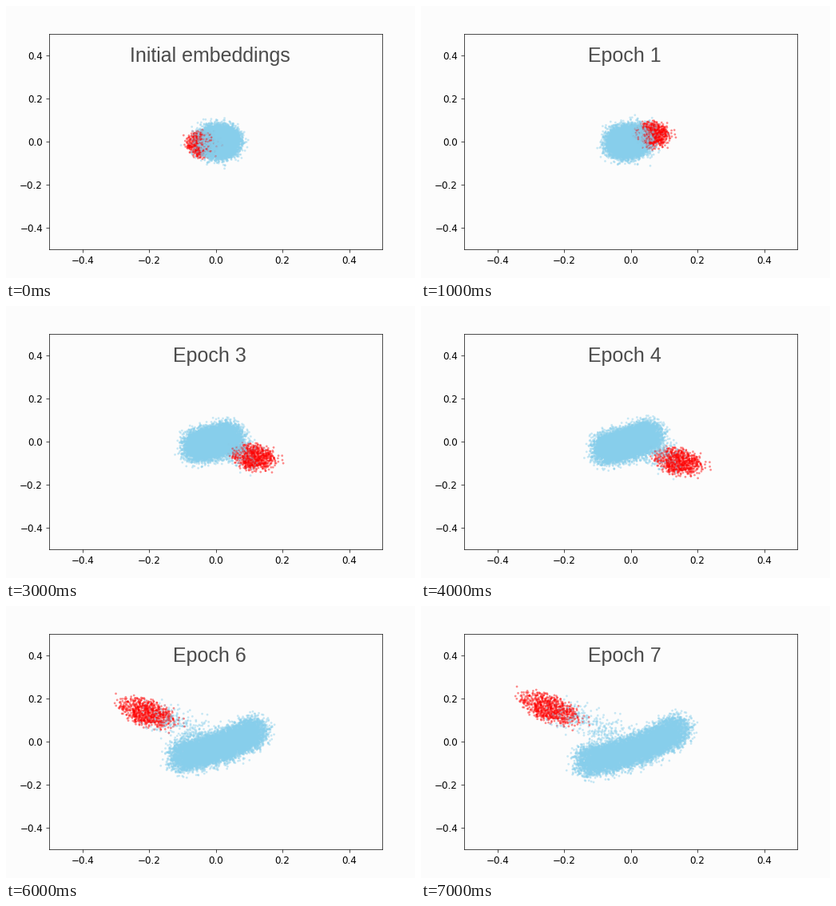
Recreate the animation shown at these times as a matplotlib script. Size 512 by 341 pixels, loop 8 s.

```python
import numpy as np
import matplotlib.pyplot as plt
from matplotlib.animation import FuncAnimation

W, H, DPI = 512, 341, 100
LEFT, RIGHT, TOP, BOTTOM = 54.4, 471.2, 34.95, 304.95
BG = "#fcfcfc"
EPOCHS = 8
N_BLUE, N_BRIDGE, N_RED = 9500, 300, 700
ORIGIN = np.array([263, 170])

rng = np.random.default_rng(7)


def soft_disc(n, core, blur):
    """Unit disc with a fuzzy rim and a few outliers."""
    r = core * np.sqrt(rng.random(n))
    a = 2 * np.pi * rng.random(n)
    disc = np.column_stack([r * np.cos(a), r * np.sin(a)])
    return disc + rng.normal(0, blur, (n, 2))


blue_disc = soft_disc(N_BLUE, 0.74, 0.22)
blue_t = rng.uniform(-1, 1, N_BLUE)
red_disc = soft_disc(N_RED, 0.80, 0.20)
bridge_t = rng.uniform(0.1, 0.9, (N_BRIDGE, 1))
bridge_noise = rng.normal(0, 10, (N_BRIDGE, 2))
order = rng.permutation(N_BLUE + N_BRIDGE + N_RED)


def place(x, y, center, tilt):
    """Rotate by tilt degrees (y up) and move to a stage position."""
    c, s = np.cos(np.radians(tilt)), np.sin(np.radians(tilt))
    return np.column_stack([c * x - s * y, -s * x - c * y]) + center


def to_data(p):
    x = (p[:, 0] - LEFT) / (RIGHT - LEFT) - 0.5
    y = 0.5 - (p[:, 1] - TOP) / (BOTTOM - TOP)
    return np.column_stack([x, y])


def points(epoch):
    # The projection axes change sign between some epochs.
    side = 1 if 1 <= epoch <= 4 else -1
    flip = -1 if epoch < 2 else 1

    # Blue: a round cloud smeared along a slowly bending line.
    reach = 11 + 2.2 * epoch**1.63
    bend = 7 * (epoch / 7) ** 3
    tilt = 20 * (1 - np.exp(-epoch / 2))
    x = 22 * blue_disc[:, 0] + reach * blue_t
    y = 22 * blue_disc[:, 1] + bend * blue_t**2
    blue = place(x, y, ORIGIN + [-4 * side, 1.5 * bend], tilt)

    # Red: an ellipse that drifts away from the blue cloud.
    shift = side * np.array([18 + 8 * epoch + 0.57 * epoch**2,
                             flip * (3 + 5.5 * epoch)])
    x, y = red_disc.T * [[20 + 3.2 * epoch], [17]]
    red = place(x, y, ORIGIN + shift, -3 * epoch)

    bridge = ORIGIN + shift * bridge_t + bridge_noise
    return to_data(np.vstack([blue, bridge, red]))[order]


plt.rcParams.update({"font.family": "DejaVu Sans", "font.size": 8.64})
fig = plt.figure(figsize=(W / DPI, H / DPI), dpi=DPI, facecolor=BG)
ax = fig.add_axes([LEFT / W, 1 - BOTTOM / H, (RIGHT - LEFT) / W,
                   (BOTTOM - TOP) / H], facecolor=BG)
ticks = np.linspace(-0.4, 0.4, 5)
ax.set(xlim=(-0.5, 0.5), ylim=(-0.5, 0.5), xticks=ticks, yticks=ticks)
ax.tick_params(length=3, pad=3, width=0.5)
for spine in ax.spines.values():
    spine.set_linewidth(0.5)

colors = np.array(["skyblue"] * (N_BLUE + N_BRIDGE) + ["red"] * N_RED)[order]
dots = ax.scatter(*points(0).T, s=4, c=colors, alpha=0.45, linewidths=0)
title = fig.text(255.2 / W, 1 - 69.8 / H, "", family="Liberation Sans",
                 size=18, color="#4c4c4c", ha="center", va="baseline")


def update(epoch):
    dots.set_offsets(points(epoch))
    title.set_text(f"Epoch {epoch}" if epoch else "Initial embeddings")
    return dots, title


anim = FuncAnimation(fig, update, frames=EPOCHS, interval=1000,
                     repeat=True, repeat_delay=0)
plt.show()
```
